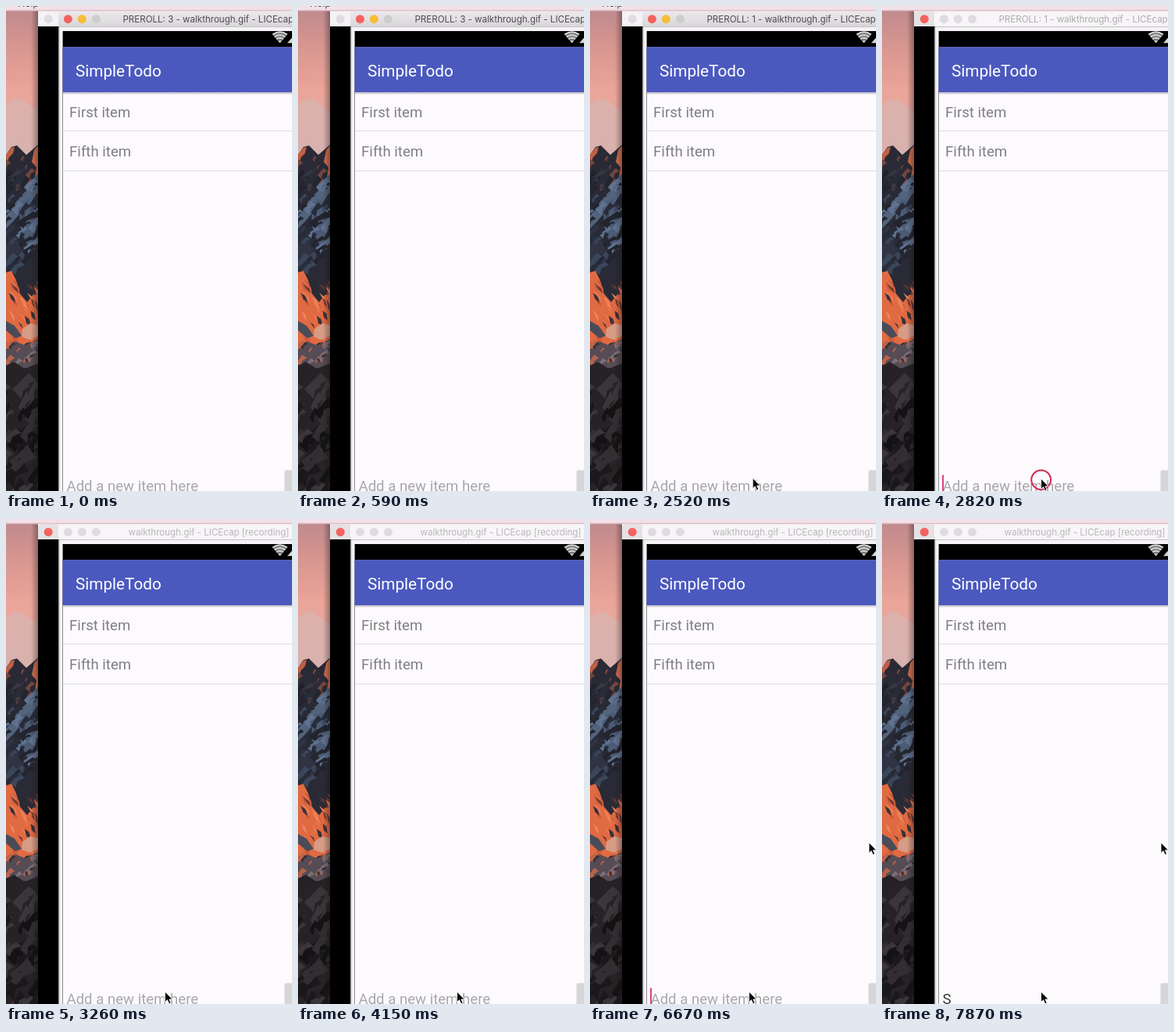
Write an HTML page that moves like this. It is 366 px wide and 619 px high and loops after 8000 ms.

```html
<!DOCTYPE html>
<html lang="en">
<head>
<meta charset="utf-8">
<title>Todo walkthrough</title>
<style>
html, body { margin: 0; width: 100%; height: 100%; overflow: hidden; background: #fcfafd; }
svg { display: block; width: 366px; height: 619px; }
text { font-family: Roboto, Arial, sans-serif; font-size: 18.6px; white-space: pre; }
.ui { font-family: Inter, "Open Sans", sans-serif; font-size: 11.55px; }
</style>
</head>
<body>
<svg viewBox="0 0 366 619">
  <defs>
    <linearGradient id="sky" x1="0" y1="0" x2="0" y2="1">
      <stop offset="0" stop-color="#c08a8d"/>
      <stop offset=".25" stop-color="#d89690"/>
      <stop offset=".55" stop-color="#eba599"/>
      <stop offset="1" stop-color="#d9aaa7"/>
    </linearGradient>
    <linearGradient id="edge">
      <stop offset="0" stop-color="#181216" stop-opacity="0"/>
      <stop offset="1" stop-color="#181216" stop-opacity=".36"/>
    </linearGradient>
    <linearGradient id="bar" x1="0" y1="0" x2="0" y2="1">
      <stop offset="0" stop-color="#ebe9eb"/>
      <stop offset="1" stop-color="#d8d6d8"/>
    </linearGradient>
    <linearGradient id="drop" x1="0" y1="0" x2="0" y2="1">
      <stop offset="0" stop-color="#55536a" stop-opacity=".4"/>
      <stop offset="1" stop-color="#55536a" stop-opacity="0"/>
    </linearGradient>
    <clipPath id="left"><rect y="6" width="41" height="613"/></clipPath>
    <path id="arrow" d="M0 0V13.4L3 10.6L5.2 15.5L7.5 14.5L5.4 9.8H9.5Z"
      fill="#080808" stroke="#fff" stroke-width=".8"/>
  </defs>

  <!-- desktop -->
  <g clip-path="url(#left)">
    <rect y="6" width="41" height="185" fill="url(#sky)"/>
    <path d="M0 126Q14 114 24 122T41 134V190H0Z" fill="#d9b4b1" opacity=".75"/>
    <g id="rocks"></g>
    <rect x="32" y="6" width="9" height="613" fill="url(#edge)"/>
  </g>
  <rect width="366" height="6" fill="#f3e0e7"/>
  <rect y="5" width="366" height="1.5" fill="#dcbcc6"/>
  <text id="menu" class="ui" x="15" y="1" fill="#473d43" style="font-size:12.5px">Help</text>

  <!-- windows -->
  <path d="M41 619V11Q41 7 45 7H366V619Z" fill="#f4f2f4"/>
  <rect id="backBar" x="41" y="7" width="27" height="20" rx="4"/>
  <rect id="frontBar" x="67" y="7" width="299" height="19.5"/>
  <rect x="67" y="26" width="299" height="1" fill="#c4c2c4"/>
  <g id="lights"></g>
  <text id="title" class="ui" y="21"></text>
  <rect x="41" y="26" width="26.5" height="593" fill="#000"/>
  <rect x="67.5" y="27" width="1" height="592" fill="#b9b7ba"/>

  <!-- phone -->
  <rect x="72.5" y="110" width="294" height="509" fill="#fcfafd"/>
  <rect x="72" y="32" width="1" height="587" fill="#918f95"/>
  <rect x="73" y="32" width="293" height="20.5" fill="#000"/>
  <g fill="none" stroke="#d4d4d4">
    <path d="M340.9 36.2Q350.5 29.2 360.1 36.2L350.5 47.2Z" fill="#777" stroke="none"/>
    <path d="M341.3 36.4Q350.5 30 359.7 36.4M343.7 39.4Q350.5 34.6 357.3 39.4M346 42.2Q350.5 39.2 355 42.2" stroke-width="1.9"/>
    <path d="M348 44.3H353L350.5 47.2ZM360 47.2L366 40.4V47.2Z" fill="#d4d4d4" stroke="none"/>
  </g>
  <rect x="72.5" y="52.3" width="294" height="57.7" fill="#4b59bf"/>
  <rect x="73" y="110" width="293" height="3.5" fill="url(#drop)"/>
  <text x="89" y="89.6" fill="#fff" style="font-size:20.7px">SimpleTodo</text>
  <g fill="#807e82">
    <text x="81.1" y="142">First item</text>
    <text x="81.1" y="192.3">Fifth item</text>
  </g>
  <path d="M73 159.5H366M73 210.5H366" stroke="#dddbdf"/>
  <rect x="356.5" y="592.5" width="14" height="30" rx="2" fill="#d6d5d7" stroke="#e6e4e8"/>
  <text id="field" x="77.5" y="618.6"></text>
  <rect id="caret" x="77" y="598.5" width="2" height="21" fill="#d9457f"/>

  <!-- pointers -->
  <circle id="ring" cx="203.6" cy="604.8" r="12.4" fill="none" stroke="#d3284b" stroke-width="2"/>
  <use id="pointer" href="#arrow"/>
  <use id="pointer2" href="#arrow" x="357" y="413"/>
</svg>
<script>
const NS = "http://www.w3.org/2000/svg";
const LOOP = 8000;
const $ = id => document.getElementById(id);

function add(parent, tag, attrs) {
  const el = document.createElementNS(NS, tag);
  for (const k in attrs) el.setAttribute(k, attrs[k]);
  return parent.appendChild(el);
}

let seed = 17;
const rnd = () => (seed = seed * 16807 % 2147483647) / 2147483647;

const rocks = $("rocks");
const face = (d, fill) => add(rocks, "path", { d, fill });

// Jagged slivers running downhill; lean sets the sideways drift
function slivers(count, y0, y1, size, lean, colors) {
  for (let i = 0; i < count; i++) {
    const x = rnd() * 41, y = y0 + rnd() * (y1 - y0);
    const h = size * (.5 + rnd()), w = h * (.2 + rnd() * .25);
    const dx = h * lean * (.4 + rnd());
    face(`M${x} ${y}l${w} ${h * .3}l${dx - w * .4} ${h * .25}l${dx * .3} ${h * .5}l${-w} ${-h * .35}Z`,
      colors[Math.floor(rnd() * colors.length)]);
  }
}

// Shaded peaks
face("M0 190L7 180L14 178L20 184L26 190L33 184L41 177V619H0Z", "#292a35");
face("M0 190L7 181L11 180L9 188L4 193L0 204Z", "#c06045");
face("M36 184L41 178V221L37 219L39 206L33 199Z", "#d4704d");
slivers(12, 186, 225, 12, -.4, ["#1f2029", "#363743", "#74463f"]);

// Blue snowfields
face("M41 214L33 222L27 235L16 245L8 258L0 268V284L10 274L19 263L31 257L41 240Z", "#52637c");
face("M17 252L30 246L38 262L39 284L31 312L25 300L18 284Z", "#4c5b74");
face("M0 287L9 279L15 297L24 318L20 330L8 337L0 334Z", "#2f3342");
slivers(44, 216, 326, 15, -.5, ["#22242e", "#282c39", "#5f7391", "#3a465a", "#22242e"]);

// Sunlit slope
face("M0 340L7 338L13 350L17 366L27 378L35 368L41 370V428L26 430L14 441L0 456Z", "#e06a42");
slivers(34, 344, 425, 13, .35, ["#f0855a", "#cb5a3b", "#6a3b38", "#ee7950", "#3c3139"]);
face("M0 402L11 408L20 421L12 424L0 414Z", "#4a4b59");
face("M21 412L31 405L41 407V421L30 426L20 422Z", "#d79c86");
face("M0 438L12 428L24 433L41 425V462H0Z", "#554c55");
slivers(16, 424, 450, 11, -.4, ["#322f38", "#7a6f79", "#b8624a"]);

// Dark foreground
face("M0 459L10 454L24 463L41 456V619H0Z", "#262226");
slivers(46, 458, 612, 20, -.4, ["#1b181b", "#332e32", "#141214", "#3b363a"]);

const lights = [54.2, 79.4, 97.3, 115.4].map(cx => add($("lights"), "circle", { cx, cy: 16.7, r: 5.5 }));
const RED = "#f4625f", YELLOW = "#f8bd38", GREY = "#dedcde";

// Times at which the text caret turns on and off
const blinks = [[2680, 3110], [3710, 4150], [4740, 5180], [5630, 6080], [6670, 7120], [7570, 7870]];
const show = (id, on) => $(id).setAttribute("visibility", on ? "visible" : "hidden");
const paint = (el, fill) => el.setAttribute("fill", fill);

function draw(t) {
  const clicked = t >= 2680, recording = t >= 3110, typed = t >= 7870;
  const count = t < 1040 ? 3 : t < 2080 ? 2 : 1;

  const title = $("title");
  title.textContent = recording
    ? "walkthrough.gif - LICEcap [recording]"
    : `PREROLL: ${count} - walkthrough.gif - LICEcap`;
  title.setAttribute("x", recording ? 156.5 : 149.5);
  paint(title, recording ? "#b9b7b9" : clicked ? "#acaaac" : "#4e4c4e");
  paint($("frontBar"), clicked ? "#f7f5f7" : "url(#bar)");
  paint($("backBar"), clicked ? "#e4e2e4" : "#f4f2f4");
  const colors = clicked ? [RED, GREY, GREY, GREY] : [GREY, RED, YELLOW, "#cecdce"];
  lights.forEach((l, i) => paint(l, colors[i]));
  show("menu", !clicked);

  const field = $("field");
  field.textContent = typed ? "S" : "Add a new item here";
  paint(field, typed ? "#3b393c" : "#a9a7ab");
  show("caret", blinks.some(([a, b]) => t >= a && t < b));

  // The pointer is sampled about every 150 ms while it glides
  const step = Math.floor((t - 2080) / 149);
  const p = Math.max(0, Math.min(1, step / 3));
  const k = p * p * (3 - 2 * p);
  $("pointer").setAttribute("transform", `translate(${221.8 - 18.3 * k} ${600.5 + 2.7 * k})`);
  show("pointer", t >= 2080);
  show("pointer2", t >= 6370);
  show("ring", t >= 2680 && t < 2970);
}

const start = performance.now();
function tick() {
  draw((performance.now() - start) % LOOP);
  requestAnimationFrame(tick);
}
tick();
</script>
</body>
</html>
```
